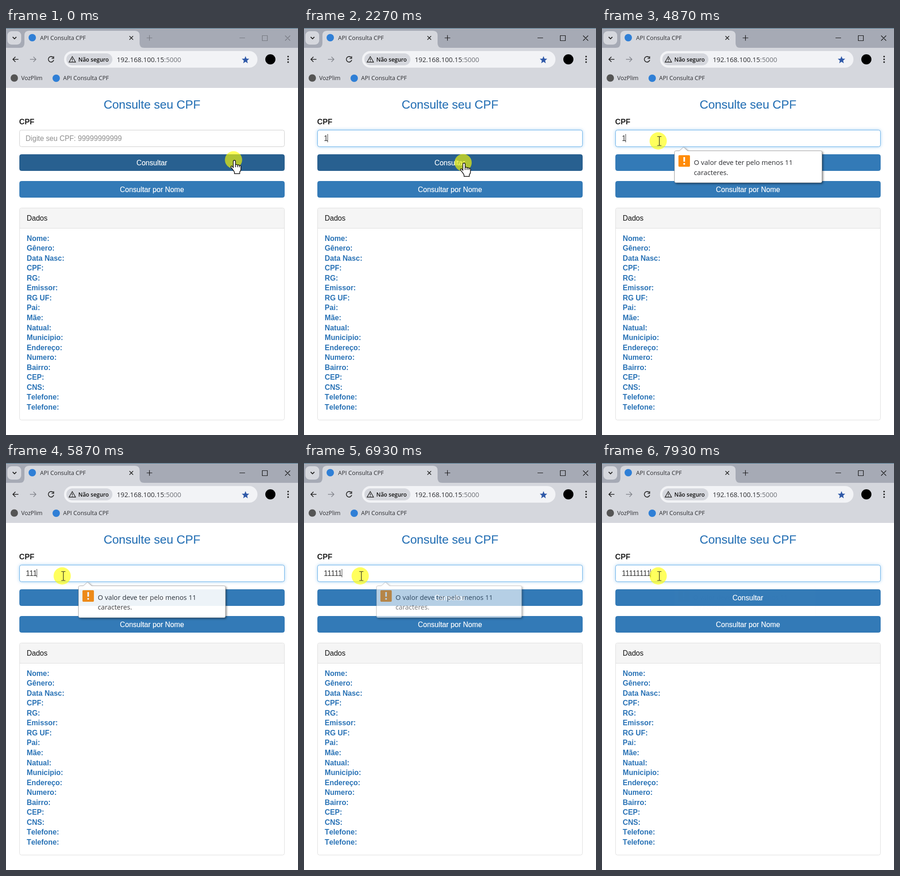
An HTML page that plays this animation: 634 px wide and 883 px high, repeating every 8000 ms.

```html
<!DOCTYPE html>
<html lang="pt-BR">
<head>
<meta charset="utf-8">
<title>API Consulta CPF</title>
<style>
html, body { margin: 0; width: 100%; height: 100%; overflow: hidden; background: #fff; }
svg { display: block; }
text { font-family: "Liberation Sans", Arial, sans-serif; font-size: 15.6px; white-space: pre; }
.ui { font-family: "Open Sans", "Noto Sans", sans-serif; font-size: 12.6px; fill: #2b2c30; }
.line { fill: none; stroke: #222; stroke-width: 1.2; }
.mid { text-anchor: middle; fill: #fff; stroke: #fff; stroke-width: .2; }
.title { font-size: 25.9px; fill: #2a73b6; stroke: #2a73b6; }
.btn { fill: #337ab7; stroke: #2e75b3; }
.btn.hover { fill: #286090; stroke: #235a8a; }
.btn.press { fill: #204d74; stroke: #122b40; }
.glow { fill: #fff; stroke: #66afe9; filter: drop-shadow(0 0 3.5px rgba(102,175,233,.6)); }
.shadow { filter: drop-shadow(2px 2px 2px rgba(0,0,0,.5)); }
#fields text { font-size: 15.8px; font-weight: bold; font-kerning: none; fill: #2a73b6; }
</style>
</head>
<body>
<svg width="634" height="883" viewBox="0 0 634 883">
  <!-- tab strip -->
  <rect width="634" height="44" fill="#a6aab5"/>
  <rect width="634" height="1" fill="#3c6e87"/>
  <rect x="3" y="7" width="30" height="29" rx="9" fill="#d5d7dd"/>
  <path class="line" style="stroke-width:1.8" d="M14.5 19.5l4 4 4-4"/>
  <path d="M30 43q10 0 10-10V16q0-10 10-10H280q10 0 10 10V33q0 10 10 10z" fill="#d5d7dd"/>
  <circle cx="57" cy="21" r="8" fill="#2f7fd6"/>
  <text class="ui" x="74" y="26">API Consulta CPF</text>
  <path class="line" style="stroke-width:1.6" d="M268 17.5l8 8m0-8l-8 8"/>
  <path id="controls" class="line" d="M305.5 21.5h12m-6-6v12M507 21.5h12M556.5 16.5h11v11h-11zM606 16.5l11 11m0-11l-11 11"/>

  <!-- toolbar -->
  <rect y="43" width="634" height="87" fill="#d5d7dd"/>
  <path class="line" style="stroke-width:1.7" d="M27 68H15m5.5-5.5L15 68l5.5 5.5"/>
  <path class="line" style="stroke-width:1.6;stroke:#85888f" d="M52 68h13m-5.5-5.5L65 68l-5.5 5.5"/>
  <path class="line" style="stroke-width:1.7" d="M102.5 64a6 6 0 1 0 1.2 5.5M103.5 61.5v4.500h-4.500"/>
  <rect x="126" y="50" width="420" height="36" rx="18" fill="#f2f3f6"/>
  <rect x="131" y="55" width="100" height="26" rx="13" fill="#d5d7dd"/>
  <path class="line" style="stroke-width:1.4" d="M144 62l7 12h-14zM144 66v4m0 1.2v1.5"/>
  <text class="ui" x="157" y="73" style="font-size:12px;font-weight:600;fill:#111">Não seguro</text>
  <text class="ui" x="240.5" y="74" style="font-size:14.5px">192.168.100.15<tspan fill="#6d7076">:5000</tspan></text>
  <path id="star" fill="#2f59a8"/>
  <circle cx="574" cy="68" r="11"/>
  <path d="M612.5 62v.01m0 5.99v.01m0 5.99v.01" stroke="#222" stroke-width="3.6" stroke-linecap="round"/>
  <circle cx="18" cy="108.5" r="8" fill="#555"/>
  <text class="ui" x="33" y="113">VozPlim</text>
  <circle cx="109" cy="109" r="8" fill="#2f7fd6"/>
  <text class="ui" x="124" y="113">API Consulta CPF</text>

  <!-- page -->
  <text class="mid title" x="317" y="175">Consulte seu CPF</text>
  <text x="28.5" y="209" style="font-size:16.5px;font-weight:bold;fill:#222">CPF</text>
  <rect x="29.5" y="221.5" width="575" height="36" rx="4" fill="#fff" stroke="#ccc"/>
  <rect id="glow" class="glow" x="29.5" y="221.5" width="575" height="36" rx="4"/>
  <text id="hint" x="42.5" y="245" fill="#8e8e8e">Digite seu CPF: 99999999999</text>
  <text id="value" x="43" y="245" style="font-size:16px;fill:#333"></text>
  <rect id="caret" y="230" width="1" height="18" fill="#333"/>
  <rect id="send" class="btn" x="29.5" y="274.5" width="575" height="35" rx="4"/>
  <text class="mid" x="316.5" y="298">Consultar</text>
  <rect class="btn" x="29.5" y="332.5" width="575" height="35" rx="4"/>
  <text class="mid" x="317" y="356">Consultar por Nome</text>
  <rect x="29.5" y="390.5" width="575" height="460" rx="4" fill="#fff" stroke="#ddd"/>
  <path d="M30 434V395q0-4 4-4H600q4 0 4 4V434z" fill="#f5f5f5"/>
  <path d="M30 434.5H604" stroke="#ddd"/>
  <text x="45" y="417.5" fill="#111">Dados</text>
  <g id="fields"></g>

  <!-- validation message -->
  <g id="bubble">
    <path class="shadow" fill="#fff" stroke="#a8a8a8" d="M160.5 266.5H168L177 258.5 186 266.5H474.5q3 0 3 3V332.500q0 3-3 3H160.500q-3 0-3-3V269.500q0-3 3-3z"/>
    <rect x="166" y="276" width="25" height="25" rx="2" fill="#ff8c0a"/>
    <path d="M178.5 280v10m0 3v3.5" stroke="#fff" stroke-width="3.5"/>
    <text class="ui" x="199.5" y="297" style="font-size:14.75px">O valor deve ter pelo menos 11</text>
    <text class="ui" x="199.5" y="318.5" style="font-size:14.75px">caracteres.</text>
  </g>

  <!-- pointer -->
  <g id="pointer">
    <circle r="18.7" fill="#ff0" opacity=".63" style="filter:blur(.7px)"/>
    <circle id="ring" fill="none" stroke="#e0524a" stroke-width="3"/>
    <g id="hand" transform="translate(2 1)">
      <path fill="#fff" stroke="#111" stroke-width="1.5" stroke-linejoin="round" d="M-2.5 16V2.5a2.4 2.4 0 0 1 4.8 0V10q2.5-2 4.3.5 2.5-1.3 4 .8 3-.8 3.4 2V19q0 4-2.5 6v4H0V26Q-1 23-7 16q-1.5-2.5.5-3.5 1.5-.5 4 3.5zM2.3 9v6m4.3-5v5m4-4v4"/>
    </g>
    <path id="beam" class="line" d="M-2-9.5H1.5L2.5-9 3.5-9.5H7M2.5-9V9.5M-2 10H1.5L2.5 9.5 3.5 10H7"/>
    <path id="arrow" fill="#fff" stroke="#111" d="M1 0V18l4-4 3 7 3-1.3-3-6.7h6z"/>
  </g>
</svg>
<script>
const $ = id => document.getElementById(id);
const clamp = v => Math.max(0, Math.min(1, v));
const show = (id, on) => $(id).style.display = on ? '' : 'none';

const labels = 'Nome,Gênero,Data Nasc,CPF,RG,Emissor,RG UF,Pai,Mãe,Natual,Municipio,Endereço,Numero,Bairro,CEP,CNS,Telefone,Telefone';
$('fields').innerHTML = labels.split(',')
  .map((s, i) => `<text x="45" y="${461.5 + i * 21.56}">${s}:</text>`).join('');

$('star').setAttribute('d', 'M' + Array.from({ length: 10 }, (_, i) => {
  const a = i * Math.PI / 5, r = i % 2 ? 3.7 : 8.5;
  return `${520 + r * Math.sin(a)} ${69.5 - r * Math.cos(a)}`;
}).join('L') + 'z');

const FOCUS = 670, PRESS = 2470, REFOCUS = 3160, TIP = 3190;
const keys = [2000, 5400, 5860, 6335, 6660, 7000, 7336, 7800];
const clicks = [FOCUS, PRESS, 4270];
const caretResets = [FOCUS, 2750, ...keys].sort((a, b) => a - b);
const path = [ // time, x, y
  [50, 494, 286], [470, 339, 243], [1980, 339, 243], [2330, 346, 296],
  [3700, 346, 296], [4000, 140, 281], [4130, 122, 245]
];
const lastOf = (list, t) => list.filter(v => v <= t).pop();

function pointerAt(t) {
  const i = path.findIndex(p => p[0] > t);
  if (i < 1) return (i ? path[path.length - 1] : path[0]).slice(1);
  const [a, b] = [path[i - 1], path[i]];
  const p = (t - a[0]) / (b[0] - a[0]), e = p * p * (3 - 2 * p);
  return [a[1] + (b[1] - a[1]) * e, a[2] + (b[2] - a[2]) * e];
}

// Each keystroke closes the message and opens it again.
function bubbleAlpha(t) {
  const s = t - lastOf(keys, t);
  if (t < keys[1]) return clamp((t - TIP) / 220);
  return s < 130 ? 1 - s / 130 : clamp((s - 130) / 220);
}

function focusAmount(t) {
  if (t < PRESS) return clamp((t - FOCUS) / 150);
  return t < REFOCUS ? 1 - clamp((t - PRESS) / 150) : clamp((t - REFOCUS) / 150);
}

function draw(t) {
  const n = keys.filter(k => k <= t).length;
  const alpha = bubbleAlpha(t), [x, y] = pointerAt(t);
  const focused = t >= FOCUS && t < PRESS || t >= REFOCUS;

  $('controls').style.stroke = t < FOCUS ? '#74777f' : '#111';
  $('glow').style.opacity = focusAmount(t);
  show('hint', !n);
  $('value').textContent = '1'.repeat(n);
  $('caret').setAttribute('x', n ? 51 + 7.72 * (n - 1) : 43);
  show('caret', focused && Math.floor((t - lastOf(caretResets, t)) / 530) % 2 === 0);

  $('bubble').style.opacity = alpha;
  const sx = .958 + .042 * alpha;
  $('bubble').setAttribute('transform', `translate(${158 * (1 - sx)} 0) scale(${sx} 1)`);

  const onTip = alpha > .5 && x > 157 && x < 478 && y > 266;
  const onButton = !onTip && y > 274 && y < 310;
  const onInput = y > 221 && y < 258;
  const pressed = t >= PRESS && t < REFOCUS;
  $('send').setAttribute('class', 'btn' + (pressed ? ' press' : onButton ? ' hover' : ''));
  $('pointer').setAttribute('transform', `translate(${x} ${y})`);
  show('hand', onButton);
  show('beam', onInput);
  show('arrow', !onButton && !onInput);

  const p = (t - lastOf(clicks, t)) / 560;
  show('ring', p < 1);
  if (p < 1) {
    $('ring').setAttribute('r', 13 + 11 * p);
    $('ring').style.opacity = .75 * (1 - p);
  }
}

function tick(now) {
  draw(now % 8000);
  requestAnimationFrame(tick);
}
draw(0);
requestAnimationFrame(tick);
</script>
</body>
</html>
```
